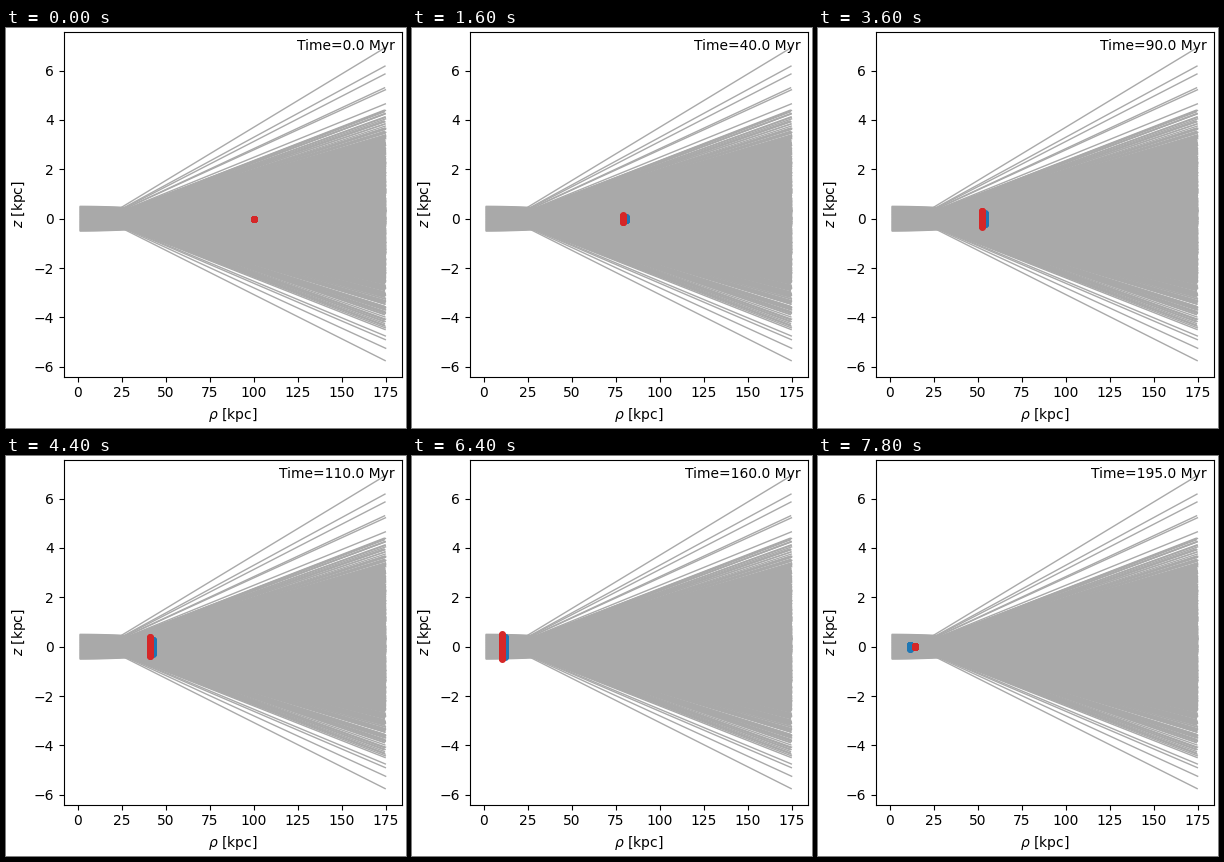
Recreate the animation shown at these times as a matplotlib script. Size 400 by 400 pixels, loop 8 s.

```python
import numpy as np
import matplotlib.pyplot as plt
from matplotlib.animation import FuncAnimation
from matplotlib.collections import LineCollection

FRAMES = 40
MYR_PER_FRAME = 5.0
TURN = 35             # time step at which the particles pass the centre
FOCUS = 14.4          # radius where the outgoing rays cross the plane
STRAYS = [6.93, 6.18, 5.86, 5.3, 5.22, 4.65, -4.75, -4.9, -5.25, -5.75]
rng = np.random.default_rng(4)


def radius(t):
    """Signed radius in kpc of the accelerating infall."""
    return 100 - 2.57 * t - 2.33e-4 * t**3


def rise(t):
    """Half height of the stream on its way in."""
    phase = np.clip(t / TURN, 0, 1) ** 1.2
    return 0.5 * np.sin(np.pi / 2 * phase)


def height(t, delay=0, scale=1, end=39.15):
    """Growing half height, then a straight squeeze towards the focus."""
    return min(scale * rise(t - delay), 0.13 * (end - t))


def lag(t):
    return 1.7 * np.tanh(t / 6) + 1.4 * (t / FRAMES) ** 6


def incoming():
    t = np.linspace(0, TURN - 0.4, 60)
    return [np.column_stack([radius(t), u * rise(t)])
            for u in np.linspace(-1, 1, 60)]


def outgoing():
    bulk = rng.normal(0, 1.7, 1500)
    bulk = bulk[np.abs(bulk + 0.05) < 4.45]
    ends = np.concatenate([bulk, STRAYS])
    return [[(FOCUS + rng.uniform(-0.3, 0.3), 0), (rng.uniform(174, 175), z)]
            for z in ends]


fig, ax = plt.subplots(figsize=(4, 4), dpi=100, layout="constrained")
tracks = LineCollection(incoming() + outgoing(), colors="darkgray",
                        linewidths=1, capstyle="projecting", zorder=1)
tracks.set_in_layout(False)
ax.add_collection(tracks, autolim=False)

ax.set_xlim(-7.9, 184.2)
ax.set_ylim(-6.395, 7.555)
ax.set_xticks(range(0, 176, 25))
ax.set_yticks(range(-6, 7, 2))
ax.set_xlabel(r"$\rho$ [kpc]")
ax.set_ylabel(r"$z$ [kpc]")

spread = np.linspace(-1, 1, 41)
blue, = ax.plot([], [], "o", color="tab:blue", ms=4, zorder=3)
red, = ax.plot([], [], "o", color="tab:red", ms=4, zorder=4)
label = ax.text(0.98, 0.98, "", transform=ax.transAxes,
                ha="right", va="top", zorder=5)


def place(dots, rho, half):
    dots.set_data(np.full_like(spread, np.hypot(rho, 0.8)), spread * half)


def update(t):
    place(red, radius(t), height(t))
    place(blue, radius(t) + lag(t), height(t, delay=4, scale=0.87, end=39.6))
    label.set_text(f"Time={t * MYR_PER_FRAME:.1f} Myr")
    return blue, red, label


anim = FuncAnimation(fig, update, frames=FRAMES, interval=200,
                     repeat=True, repeat_delay=0)
plt.show()
```
